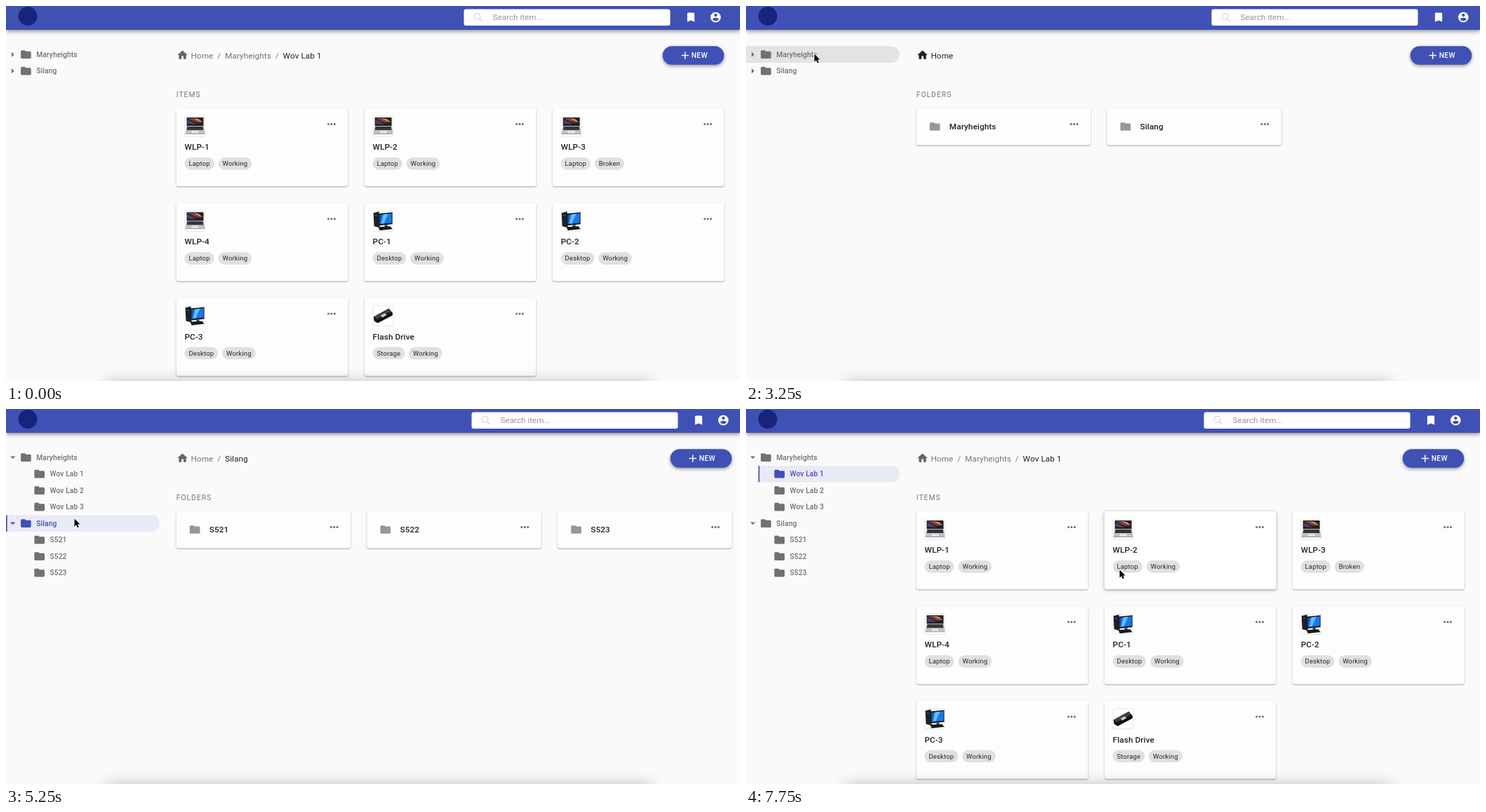
Write an HTML page with a canvas that moves like this. It is 1046 px wide and 535 px high and loops after 8000 ms.

```html
<!DOCTYPE html>
<html lang="en">
<head>
<meta charset="utf-8">
<title>Equipment inventory</title>
<style>
html, body { margin: 0; width: 100%; height: 100%; overflow: hidden; background: #fafafa; }
canvas { display: block; }
</style>
</head>
<body>
<canvas id="stage" width="1046" height="535"></canvas>
<script>
const ctx = document.getElementById('stage').getContext('2d');
const W = 1046, H = 535, LOOP = 8000, UNIT = 0.7333;
const BLUE = '#3f51b5', GRAY = '#717171', DARK = '#212121';
const LEFT = 242.7;

const ICONS = {
  folder: new Path2D('M10 4H4c-1.1 0-1.99.9-1.99 2L2 18c0 1.1.9 2 2 2h16c1.1 0 2-.9 2-2V8c0-1.1-.9-2-2-2h-8l-2-2z'),
  home: new Path2D('M10 20v-6h4v6h5v-8h3L12 3 2 12h3v8z'),
  bookmark: new Path2D('M17 3H7c-1.1 0-1.99.9-1.99 2L5 21l7-3 7 3V5c0-1.1-.9-2-2-2z'),
  account: new Path2D('M12 2C6.48 2 2 6.48 2 12s4.48 10 10 10 10-4.48 10-10S17.52 2 12 2zm0 3c1.66 0 3 1.34 3 3s-1.34 3-3 3-3-1.34-3-3 1.34-3 3-3zm0 14.2c-2.5 0-4.71-1.28-6-3.22.03-1.99 4-3.08 6-3.08 1.99 0 5.97 1.09 6 3.08-1.29 1.94-3.5 3.22-6 3.22z'),
  plus: new Path2D('M19 13h-6v6h-2v-6H5v-2h6V5h2v6h6v2z'),
  pointer: new Path2D('M0 0V11.2L2.6 8.8L4.3 12.8L6.3 11.9L4.6 8H8Z')
};

const TREE = {
  Maryheights: ['Wov Lab 1', 'Wov Lab 2', 'Wov Lab 3'],
  Silang: ['S521', 'S522', 'S523']
};

const ITEMS = [
  ['WLP-1', 'Laptop'], ['WLP-2', 'Laptop'], ['WLP-3', 'Laptop', 'Broken'],
  ['WLP-4', 'Laptop'], ['PC-1', 'Desktop'], ['PC-2', 'Desktop'],
  ['PC-3', 'Desktop'], ['Flash Drive', 'Storage']
];

const PAGES = {
  lab: { path: ['Home', 'Maryheights', 'Wov Lab 1'], items: true },
  home: { path: ['Home'], folders: Object.keys(TREE) },
  mary: { path: ['Home', 'Maryheights'], folders: TREE.Maryheights },
  silang: { path: ['Home', 'Silang'], folders: TREE.Silang },
  loading: { path: [] }
};

// Each entry changes only the listed parts of the state.
const TIMELINE = [
  [0, { page: 'lab', open: [], selected: '', hover: '', card: -1, link: false, status: false, mouse: null }],
  [250, { mouse: [199, 66] }],
  [500, { mouse: [274, 66] }],
  [1000, { mouse: [275, 72], link: true }],
  [1250, { status: true }],
  [1500, { page: 'home', link: false }],
  [1750, { mouse: [268, 84], status: false }],
  [2000, { mouse: [255, 105] }],
  [2250, { mouse: [250, 152], card: 0 }],
  [2500, { mouse: [212, 128], card: -1 }],
  [2750, { mouse: [142, 96], hover: 'Silang' }],
  [3000, { mouse: [108, 74], hover: 'Maryheights' }],
  [3250, { mouse: [97, 68] }],
  [3500, { open: ['Maryheights'], selected: 'Maryheights', hover: '' }],
  [3750, { page: 'mary' }],
  [4000, { mouse: [112, 90], hover: 'Wov Lab 1' }],
  [4500, { mouse: [104, 132], hover: 'Wov Lab 3' }],
  [4750, { mouse: [97, 156], hover: 'Silang' }],
  [5000, { open: ['Maryheights', 'Silang'], selected: 'Silang', hover: '', page: 'silang' }],
  [5250, { mouse: [97, 156] }],
  [6250, { mouse: [98, 138], hover: 'Wov Lab 3' }],
  [6500, { mouse: [99, 112], hover: 'Wov Lab 2' }],
  [6750, { mouse: [99, 101], hover: 'Wov Lab 1' }],
  [7000, { page: 'loading', selected: 'Wov Lab 1', hover: '' }],
  [7250, { page: 'lab' }],
  [7500, { mouse: [330, 180], card: 0 }],
  [7750, { mouse: [532, 229], card: 1 }]
];

const stateAt = time => Object.assign({}, ...TIMELINE.filter(([at]) => at <= time).map(entry => entry[1]));

function text(label, x, y, size, color, weight = 400, spacing = 0.11) {
  ctx.font = `${weight} ${size}px Roboto, sans-serif`;
  ctx.letterSpacing = spacing + 'px';
  ctx.fillStyle = color;
  ctx.fillText(label, x, y);
  return ctx.measureText(label).width;
}

function box(x, y, w, h, radius, color) {
  ctx.fillStyle = color;
  ctx.beginPath();
  ctx.roundRect(x, y, w, h, radius);
  ctx.fill();
}

function poly(color, ...points) {
  ctx.fillStyle = color;
  ctx.beginPath();
  for (const [x, y] of points) ctx.lineTo(x, y);
  ctx.fill();
}

function dot(x, y, radius, color) {
  ctx.fillStyle = color;
  ctx.beginPath();
  ctx.arc(x, y, radius, 0, 7);
  ctx.fill();
}

function withShadow(alpha, blur, dy, draw) {
  ctx.save();
  ctx.shadowColor = `rgba(0,0,0,${alpha})`;
  ctx.shadowBlur = blur;
  ctx.shadowOffsetY = dy;
  draw();
  ctx.restore();
}

function icon(name, cx, cy, color) {
  ctx.save();
  ctx.translate(cx, cy);
  ctx.scale(UNIT, UNIT);
  ctx.translate(-12, -12);
  ctx.fillStyle = color;
  ctx.fill(ICONS[name], 'evenodd');
  ctx.restore();
}

function navbar(shift) {
  withShadow(0.45, 6, 2, () => box(0, -10, W, 44, 0, BLUE));
  dot(31, 14.5, 13.5, '#18247c');
  box(652.5 + shift, 4.5, 294, 23.5, 3, '#fff');
  ctx.strokeStyle = '#d2d2d2';
  ctx.lineWidth = 1.1;
  ctx.beginPath();
  ctx.arc(671.5 + shift, 14.8, 4.4, 0, 7);
  ctx.moveTo(674.7 + shift, 18);
  ctx.lineTo(679 + shift, 22);
  ctx.stroke();
  text('Search item...', 693.5 + shift, 20, 11.73, '#969696', 400, 0);
  icon('bookmark', 976 + shift, 16, '#fff');
  icon('account', 1011.3 + shift, 16, '#fff');
}

function treeRow(label, level, cy, state) {
  const x = level * 17.6, active = state.selected === label;
  if (active || state.hover === label) {
    box(x, cy - 11.7, 219 - x, 23.4, [0, 11.7, 11.7, 0], active ? '#e8eaf6' : '#e3e3e3');
    if (active) box(x, cy - 11.7, 1.7, 23.4, 0, BLUE);
  }
  const color = active ? BLUE : GRAY;
  icon('folder', 28.4 + level * 19.3, cy, color);
  text(label, 43.2 + level * 19.2, cy + 3.7, 10.27, color, 500);
  if (level) return;
  if (state.open.includes(label)) poly(color, [6, cy - 1.8], [13.4, cy - 1.8], [9.7, cy + 1.9]);
  else poly(color, [8, cy - 3.6], [11.8, cy], [8, cy + 3.6]);
}

function sidebar(state) {
  let cy = 69.2;
  for (const [parent, children] of Object.entries(TREE)) {
    treeRow(parent, 0, cy, state);
    cy += 23.5;
    if (!state.open.includes(parent)) continue;
    for (const child of children) {
      treeRow(child, 1, cy, state);
      cy += 23.5;
    }
  }
}

function breadcrumb(path, underlined) {
  icon('home', 251.5, 70, path.length > 1 ? '#666' : DARK);
  let x = 263.4;
  path.forEach((label, i) => {
    if (i) x += 5.87 + text('/', x + 5.87, 74.5, 11.73, '#757575') + 5.87;
    const width = text(label, x, 74.5, 11.73, i === path.length - 1 ? DARK : '#757575');
    if (underlined && !i) box(x, 76, width, 1, 0, '#757575');
    x += width;
  });
}

function newButton(shift) {
  withShadow(0.4, 5, 2, () => box(935.7 + shift, 57.3, 87.6, 26.5, 13.2, BLUE));
  icon('plus', 967.7 + shift, 70.6, '#fff');
  text('NEW', 976.7 + shift, 74.3, 10.27, '#fff', 500, 0.29);
}

function card(x, y, w, h, hovered) {
  const paper = hovered ? '#fff' : '#fdfdfd';
  withShadow(hovered ? 0.32 : 0.2, hovered ? 5 : 3, 1, () => box(x, y, w, h, 3, paper));
  withShadow(0.2, 1, 1, () => box(x, y, w, h, 3, paper));
  for (let i = 0; i < 3; i++) dot(x + w - 27.8 + i * 4.4, y + 22.5, 1.5, '#6c6c6c');
}

const PHOTOS = {
  Laptop() {
    box(3, 2, 24, 13, 1, '#211f28');
    poly('#8b3b3c', [4, 3], [13, 3], [23, 10], [16, 9]);
    poly('#d58b48', [12, 3], [20, 4], [26, 9], [21, 8]);
    poly('#4d4165', [4, 5], [11, 8], [17, 12], [4, 11]);
    poly('#bfc0c4', [3, 14], [27, 14], [29, 25], [1, 25]);
    poly('#34353a', [4, 15], [26, 15], [27, 20], [3, 20]);
    box(10, 21, 10, 3.5, 0.5, '#e4e4e7');
    box(1, 25, 28, 1, 0, '#97979c');
  },
  Desktop() {
    poly('#1c2129', [1, 3], [9, 1], [10, 24], [2, 22]);
    box(3, 6, 4, 1, 0, '#59606a');
    poly('#15181f', [8, 4], [28, 2], [28, 19], [9, 21]);
    poly('#147ae8', [10, 6], [27, 3.5], [27, 17], [10, 19]);
    poly('#64baff', [15, 5], [22, 4], [16, 18], [12, 18]);
    poly('#1654b1', [10, 7], [13, 6], [11, 18], [10, 18]);
    box(17, 20, 4, 3, 0, '#33373e');
    poly('#17191d', [8, 23], [25, 22], [28, 26], [10, 28]);
  },
  Storage() {
    poly('#1d1d1f', [1, 16], [23, 4], [28, 10], [28, 14], [7, 25], [2, 22]);
    poly('#424246', [2, 16], [23, 5], [26, 8], [6, 19]);
    poly('#c9c9c9', [11, 14], [17, 11], [20, 13], [14, 17]);
    poly('#09090a', [3, 19], [7, 21], [28, 10], [28, 13], [7, 24]);
  }
};

function photo(kind, x, y) {
  box(x, y, 29.5, 29.5, 3, '#dedede');
  box(x + 0.7, y + 0.7, 28.1, 28.1, 2.5, '#fff');
  ctx.save();
  ctx.beginPath();
  ctx.rect(x + 0.7, y + 0.7, 28.1, 28.1);
  ctx.clip();
  ctx.translate(x, y);
  PHOTOS[kind]();
  ctx.restore();
}

function chip(label, x, y) {
  ctx.font = '400 9.53px Roboto, sans-serif';
  ctx.letterSpacing = '0.15px';
  const width = ctx.measureText(label).width + 11.8;
  box(x, y, width, 17.6, 8.8, '#e0e0e0');
  text(label, x + 5.9, y + 12.1, 9.53, '#272727', 400, 0.15);
  return width;
}

function itemGrid(hovered) {
  ITEMS.forEach(([name, kind, condition = 'Working'], i) => {
    const x = LEFT + (i % 3) * 268.1, y = 146 + Math.floor(i / 3) * 135.2;
    card(x, y, 244.6, 111.3, hovered === i);
    photo(kind, x + 11.8, y + 11);
    text(name, x + 11.8, y + 59.2, 11.73, DARK, 500);
    const width = chip(kind, x + 11.8, y + 70.1);
    chip(condition, x + 17.7 + width, y + 70.1);
  });
}

function folderGrid(names, hovered) {
  names.forEach((name, i) => {
    const x = LEFT + i * 271.7;
    card(x, 146, 248.3, 52.5, hovered === i);
    icon('folder', x + 26.4, 172, '#979797');
    text(name, x + 47.1, 176.1, 11.73, DARK, 500);
  });
}

function statusBar() {
  box(0, 522, 226, 14, [0, 3, 0, 0], '#3b3b3d');
  text('https://equipment-inventory-system.herokuapp.com/#/', 2, 533, 8.9, '#d3d3d3', 400, 0);
}

function pointer([x, y]) {
  ctx.save();
  ctx.translate(x + 0.5, y + 0.5);
  ctx.lineJoin = 'round';
  ctx.lineWidth = 1.6;
  ctx.strokeStyle = '#fff';
  ctx.stroke(ICONS.pointer);
  ctx.fillStyle = '#000';
  ctx.fill(ICONS.pointer);
  ctx.restore();
}

function draw(time) {
  const state = stateAt(time), page = PAGES[state.page];
  const shift = page.items ? 0 : 11;
  ctx.fillStyle = '#fafafa';
  ctx.fillRect(0, 0, W, H);
  sidebar(state);
  if (page.path.length) {
    breadcrumb(page.path, state.link);
    newButton(shift);
    text(page.items ? 'ITEMS' : 'FOLDERS', LEFT, 130.2, 10.27, '#757575', 400, 1.05);
    if (page.items) itemGrid(state.card);
    else folderGrid(page.folders, state.card);
  }
  withShadow(0.28, 22, 0, () => box(142, 537, 778, 20, 0, '#ccc'));
  navbar(shift);
  if (state.status) statusBar();
  if (state.mouse) pointer(state.mouse);
}

function tick() {
  draw(performance.now() % LOOP);
  requestAnimationFrame(tick);
}
tick();
</script>
</body>
</html>
```
